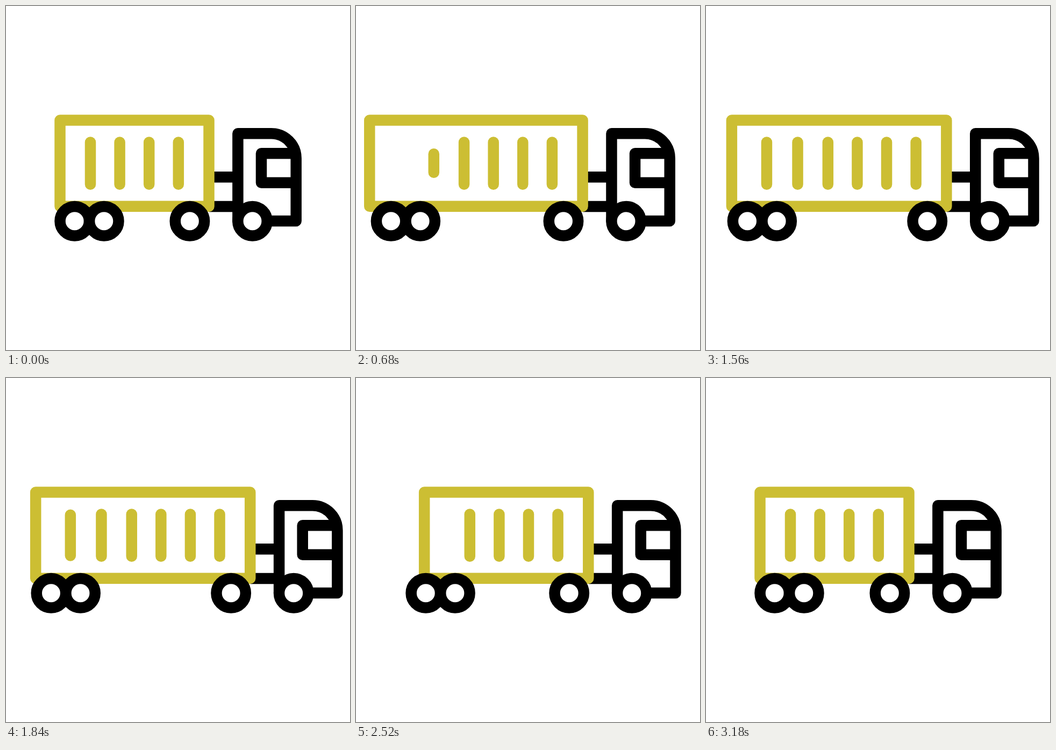
Animation, 640 px wide and 640 px high, one loop 3.6 s. Source, as an HTML page:

```html
<!DOCTYPE html>
<html lang="en">
<head>
<meta charset="utf-8">
<title>Truck</title>
<style>
  html, body { margin: 0; width: 100%; height: 100%; overflow: hidden; background: #fff; }
  svg { display: block; width: 100vw; height: 100vh; fill: none; stroke: #000; stroke-width: 20.5; stroke-linejoin: round; }
  .load { stroke: #ccbe33; }
  .bars { stroke-linecap: round; }
  circle { fill: #fff; }
</style>
</head>
<body>
<svg viewBox="0 0 640 640">
  <g id="truck">
    <path d="M378 318.3H431M378 372.9H431"/>
    <path d="M458 400.1H431.4V237.2H493.5A46.2 46.2 0 0 1 539.7 283.4V400.1Z"/>
    <path d="M539.7 274.3H475V328.7H539.7"/>
    <path id="box" class="load"/>
    <g id="bars" class="load bars"></g>
    <g id="rear">
      <circle cx="127.7" cy="400.2" r="27.2"/>
      <circle cx="182.3" cy="400.2" r="27.2"/>
    </g>
    <circle cx="341.9" cy="400.2" r="27.2"/>
    <circle cx="458.5" cy="400.2" r="27.2"/>
  </g>
</svg>
<script>
const LOOP = 3600, STEP = 20;
const $ = id => document.getElementById(id);

const smooth = u => u * u * (3 - 2 * u);
const soft = u => (u + smooth(u)) / 2;
const launch = u => u * u * (2 - u);

// Each row: start, end, value at start, value at end, easing
const drive = [
  [0, 500, 0, 41, smooth],
  [500, 1990, 41, 79.2, soft],
  [1990, 3180, 79.2, 0, launch]
];
const grow = [[0, 752, 0, 122.5, smooth], [1803, 2843, 122.5, 0, smooth]];
const roll = [[88, 838, 0, 120.5, smooth], [1926, 3022, 120.5, 0, smooth]];

// Bars that open and close from their middle
const extra = [
  { x: 100.7, rows: [[496, 896, 0, 1, smooth], [2058, 2458, 1, 0, smooth]] },
  { x: 43.1, rows: [[700, 1100, 0, 1, smooth], [1796, 2196, 1, 0, smooth]] }
];

function at(rows, t) {
  let value = rows[0][2];
  for (const [start, end, from, to, ease] of rows) {
    if (t < start) break;
    value = from + (to - from) * ease(Math.min(1, (t - start) / (end - start)));
  }
  return value;
}

function addBar() {
  const bar = document.createElementNS("http://www.w3.org/2000/svg", "path");
  $("bars").append(bar);
  return bar;
}

function setBar(bar, x, open) {
  const half = 39.2 * open;
  bar.setAttribute("d", open > 0.002 ? `M${x} ${292.6 - half}V${292.6 + half}` : "");
}

for (const x of [157, 211.6, 266.2, 320.8]) setBar(addBar(), x, 1);
for (const bar of extra) bar.node = addBar();

function draw(t) {
  $("truck").setAttribute("transform", `translate(${at(drive, t)} 0)`);
  $("rear").setAttribute("transform", `translate(${-at(roll, t)} 0)`);
  $("box").setAttribute("d", `M377.5 212.6V372.8H${100.5 - at(grow, t)}V212.6Z`);
  for (const { node, x, rows } of extra) setBar(node, x, at(rows, t));
}

const began = performance.now();
function tick() {
  const t = (performance.now() - began) % LOOP;
  draw(Math.floor(t / STEP) * STEP);
  requestAnimationFrame(tick);
}
tick();
</script>
</body>
</html>
```
